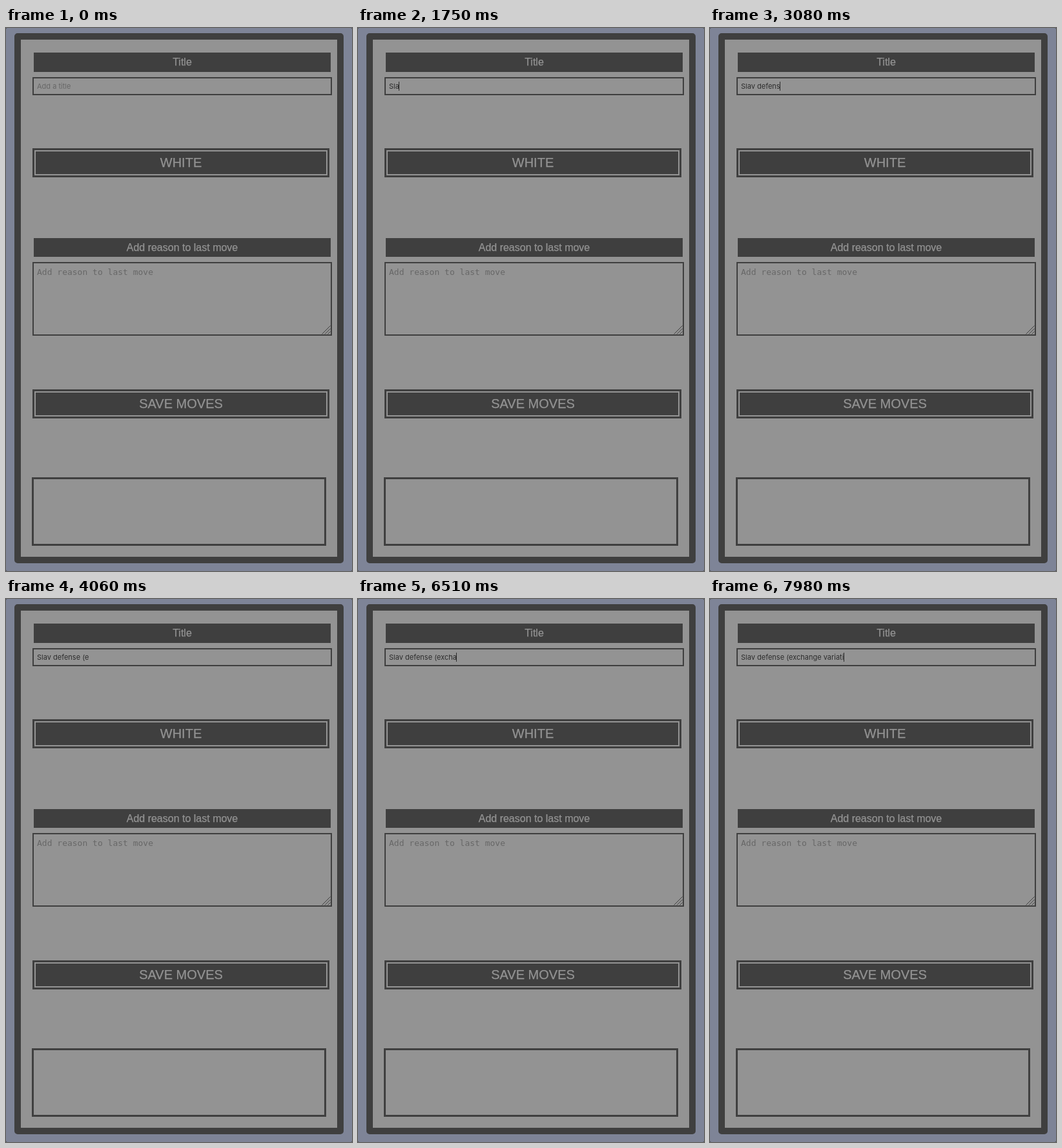
An HTML page for the animation above (8 s loop, 536 px wide and 840 px high).

```html
<!DOCTYPE html>
<html lang="en">
<head>
<meta charset="utf-8">
<title>Move notes form</title>
<style>
  :root { --dark: #3f3f3f; --light: #939393; --hint: #676767; --ink: #2d2d2d; }
  html, body { margin: 0; width: 100%; height: 100%; overflow: hidden; background: #3f424c; }
  #stage { position: relative; width: 536px; height: 840px; overflow: hidden; border-radius: 2px; background: #7e8497; }
  #stage * { position: absolute; box-sizing: border-box; white-space: pre; }
  .panel { left: 13px; top: 8px; width: 510px; height: 820px; border: 10px solid var(--dark); border-radius: 5px; background: var(--light); }
  .bar, .button { background: var(--dark); color: var(--light); text-align: center; font-family: "Liberation Sans", Arial, sans-serif; -webkit-text-stroke: .25px; }
  .bar { left: 43px; width: 460px; font-size: 16px; }
  .button { left: 41px; width: 460px; height: 45px; font-size: 20px; line-height: 45px; }
  .button::after { content: ""; position: absolute; inset: 3px; border: 2px solid var(--light); }
  .box { border: 2px solid var(--dark); }
  .field { left: 48px; top: 83px; font: 11px/14px Inter, sans-serif; color: var(--ink); }
  .hint { color: var(--hint); }
  #caret { top: 83px; width: 1px; height: 14px; background: var(--ink); }
  .note { left: 48px; top: 370px; font: 13px/15px "DejaVu Sans Mono", monospace; }
  .grip { left: 488px; top: 459px; stroke: var(--dark); fill: none; }
</style>
</head>
<body>
<div id="stage">
  <div class="panel"></div>
  <div class="bar" style="top:38px;height:30px;line-height:30px">Title</div>
  <div class="box" style="left:41px;top:76px;width:464px;height:28px"></div>
  <span class="field" id="field"></span>
  <div id="caret"></div>
  <div class="button" style="top:186px">WHITE</div>
  <div class="bar" style="top:325px;height:29px;line-height:29px">Add reason to last move</div>
  <div class="box" style="left:41px;top:362px;width:464px;height:114px"></div>
  <span class="note hint">Add reason to last move</span>
  <svg class="grip" width="15" height="15"><path d="M1.5 14.5L14.5 1.5M6 14.5L14.5 6M10.5 14.5L14.5 10.5"/></svg>
  <div class="button" style="top:559px">SAVE MOVES</div>
  <div class="box" style="left:40px;top:695px;width:456px;height:106px;border-width:3px"></div>
</div>
<script>
  const LOOP = 8000;
  const field = document.getElementById("field");
  const caret = document.getElementById("caret");

  // Each step: start time, text, caret shown
  const steps = [[0, "", false], [490, "", true], [1050, "", false]];
  let text = "";
  const add = (time, shown = true) => steps.push([time, text, shown]);
  const type = (chars, times) => times.forEach((time, i) => { text += chars[i]; add(time); });
  const erase = times => times.forEach(time => { text = text.slice(0, -1); add(time); });

  type("Slav d", [1400, 1540, 1750, 1890, 2100, 2310]);
  type("efense (", [2520, 2660, 2800, 2940, 3080, 3220, 3360, 3500]);
  text += "e";
  add(4060, false);
  type("scha", [4340, 4550, 4690, 4900]);
  erase([5180, 5250, 5390, 5530]);
  type("xchange v", [5880, 6300, 6440, 6510, 6650, 6790, 6930, 7140, 7280]);
  type("ariati", [7420, 7560, 7630, 7770, 7840, 7980]);

  let current;
  function show(step) {
    if (step === current) return;
    current = step;
    const [, value, shown] = step;
    field.textContent = value || "Add a title";
    field.classList.toggle("hint", !value);
    const width = value ? field.getBoundingClientRect().width : 0;
    caret.style.left = 48 + Math.floor(width) + "px";
    caret.style.visibility = shown ? "visible" : "hidden";
  }

  const start = performance.now();
  function frame() {
    const time = (performance.now() - start) % LOOP;
    show(steps.findLast(step => step[0] <= time));
    requestAnimationFrame(frame);
  }
  frame();
</script>
</body>
</html>
```
